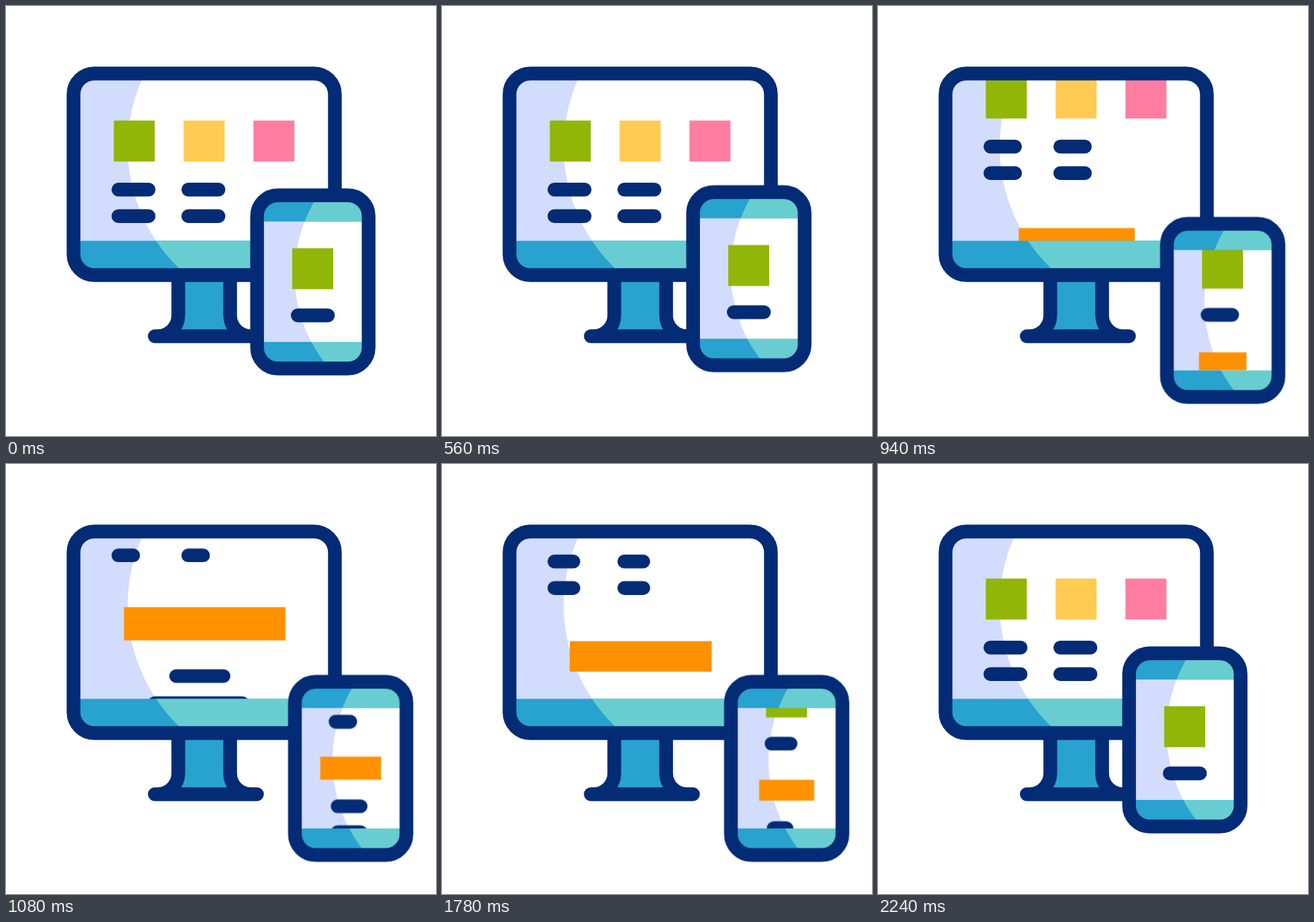
An HTML page that plays this animation: 640x640 px, repeating every 2.4 s.

```html
<!DOCTYPE html>
<html lang="en">
<head>
<meta charset="utf-8">
<title>Responsive screens</title>
<style>
  html, body { margin: 0; width: 100%; height: 100%; overflow: hidden; background: #fff; }
  svg { display: block; width: 100vw; height: 100vh; }

  .frame, .line, .stand { stroke: #042b76; stroke-width: 20.4; stroke-linecap: round; stroke-linejoin: round; fill: none; }
  .pale { fill: #d2dcfd; }
  .white { fill: #fff; }
  .teal { fill: #28a2ce; }
  .aqua { fill: #67cdd1; }
  .green { fill: #91b608; }
  .yellow { fill: #ffcb52; }
  .pink { fill: #ff7da0; }
  .orange { fill: #ff9100; }

  /* One loop; the bezier is an exact smoothstep between keyframes. */
  .phone, .scroll, .banner, .out, .in {
    animation: 2400ms cubic-bezier(.33333, 0, .66667, 1) infinite;
  }
  .phone { animation-name: hop; }
  .scroll { animation-name: scroll; }
  .banner { animation-name: grow; transform-box: fill-box; transform-origin: center; }
  .out { animation-name: shrink; }
  .in { animation-name: stretch; }

  @keyframes hop {
    0%, 8.3333%, 25%, 91.6667%, 100% { transform: translate(0, 0); }
    16.6667% { transform: translate(0, -48px); }
    33.3333%, 83.3333% { transform: translate(56.3px, 42.4px); }
  }
  @keyframes scroll {
    0%, 33.3333%, 83.3333%, 100% { transform: translateY(0); }
    50%, 66.6667% { transform: translateY(var(--up)); }
  }
  @keyframes grow {
    0%, 33.3333%, 83.3333%, 100% { transform: scale(var(--sx), var(--sy)); }
    50%, 66.6667% { transform: scale(1, 1); }
  }
  @keyframes shrink {
    0%, 33.3333%, 83.3333%, 100% { stroke-dasharray: 1 2; }
    50%, 66.6667% { stroke-dasharray: .35 2; }
  }
  @keyframes stretch {
    0%, 33.3333%, 66.6667%, 100% { stroke-dasharray: var(--min) 2; }
    50% { stroke-dasharray: 1 2; }
  }
</style>
</head>
<body>
<svg viewBox="0 0 640 640">
  <defs>
    <clipPath id="wide"><rect x="100.5" y="100.5" width="389" height="300" rx="31"/></clipPath>
    <clipPath id="tall"><rect x="373.7" y="281.7" width="166" height="258" rx="31"/></clipPath>
    <clipPath id="wideLight"><circle cx="432.5" cy="210.1" r="251.4"/></clipPath>
    <clipPath id="tallLight"><circle cx="645.8" cy="399.4" r="216.2"/></clipPath>
  </defs>

  <!-- stand -->
  <rect class="teal" x="256.4" y="400" width="77.2" height="91"/>
  <path class="stand" d="M256.4 400V460.5A31 31 0 0 1 225.4 491.5M333.6 400V460.5A31 31 0 0 0 364.6 491.5M221.4 491.5H373.6"/>

  <!-- monitor -->
  <g clip-path="url(#wide)">
    <rect class="pale" x="100" y="100" width="390" height="301"/>
    <rect class="white" x="100" y="100" width="390" height="301" clip-path="url(#wideLight)"/>
    <g class="scroll" style="--up: -224.5px">
      <rect class="green" x="160.5" y="170.5" width="61" height="61"/>
      <rect class="yellow" x="264.4" y="170.5" width="61" height="61"/>
      <rect class="pink" x="368.3" y="170.5" width="61" height="61"/>
      <path class="line out" pathLength="1" d="M167.3 273.2h45"/>
      <path class="line out" pathLength="1" d="M167.3 312.8h45"/>
      <path class="line out" pathLength="1" d="M271.3 273.2h45"/>
      <path class="line out" pathLength="1" d="M271.3 312.8h45"/>
      <rect class="orange banner" style="--sx: .5; --sy: .65" x="161.3" y="387.8" width="269" height="53.5"/>
      <path class="line in" style="--min: .32" pathLength="1" d="M253.2 492.4h82.5"/>
      <path class="line in" style="--min: .417" pathLength="1" d="M221.4 532.8h148.7"/>
    </g>
    <rect class="teal" x="100" y="349.5" width="390" height="52"/>
    <rect class="aqua" x="100" y="349.5" width="390" height="52" clip-path="url(#wideLight)"/>
  </g>
  <rect class="frame" x="100.5" y="100.5" width="389" height="300" rx="31"/>

  <!-- phone -->
  <g class="phone">
    <g clip-path="url(#tall)">
      <rect class="pale" x="373" y="281" width="167" height="259"/>
      <rect class="white" x="373" y="281" width="167" height="259" clip-path="url(#tallLight)"/>
      <g class="scroll" style="--up: -151.7px">
        <rect class="green" x="426" y="360.5" width="61" height="61"/>
        <path class="line out" pathLength="1" d="M434.2 460.5h45"/>
        <rect class="orange banner" style="--sx: .6; --sy: .6" x="407.2" y="511" width="99" height="37.5"/>
        <path class="line in" style="--min: .5" pathLength="1" d="M437.3 586.4h38.3"/>
        <path class="line in" style="--min: .5" pathLength="1" d="M437.3 625h38.3"/>
      </g>
      <path class="teal" d="M373 281h167v39.8h-167zM373 500h167v40h-167z"/>
      <path class="aqua" d="M373 281h167v39.8h-167zM373 500h167v40h-167z" clip-path="url(#tallLight)"/>
    </g>
    <rect class="frame" x="373.7" y="281.7" width="166" height="257.8" rx="31"/>
  </g>
</svg>
</body>
</html>
```
